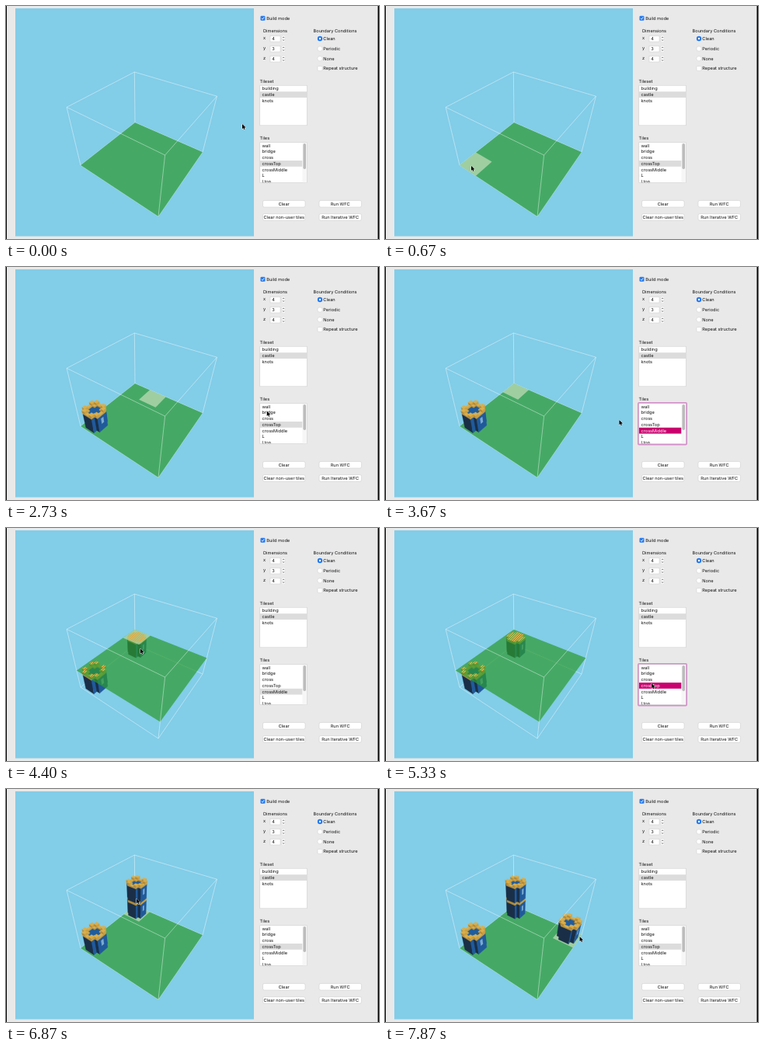
Recreate the animation shown at these times as an HTML page with a canvas. Size 480 by 300 pixels, loop 8000 ms.

```html
<!DOCTYPE html>
<html lang="en">
<head>
<meta charset="utf-8">
<title>Tile builder</title>
<style>
html, body { margin: 0; width: 100%; height: 100%; overflow: hidden; background: #e9e9e9; }
svg, canvas { position: absolute; left: 0; top: 0; width: 480px; height: 300px; }
text { font: 5.65px Inter, "Liberation Sans", sans-serif; fill: #111; text-rendering: geometricPrecision; }
.box { fill: #fff; stroke: #c9c9c9; stroke-width: .5; }
</style>
</head>
<body>
<svg id="panel" viewBox="0 0 480 300"></svg>
<canvas id="view"></canvas>
<script>
// ---- side panel ----
const text = (x, y, s, extra = '') => `<text x="${x}" y="${y}" ${extra}>${s}</text>`;
const rect = (x, y, w, h, extra = 'class="box"') =>
  `<rect x="${x}" y="${y}" width="${w}" height="${h}" ${extra}/>`;
const ROW = 7.75;
const tiles = ['wall', 'bridge', 'cross', 'crossTop', 'crossMiddle', 'L', 'Ltop'];
const rows = (list, y) => list.map((s, i) => text(329.5, y + i * ROW, s)).join('');
const dimension = (name, value, y) =>
  text(331, y + 1.2, name) + rect(340, y - 3.8, 13, 7.6) + text(342.3, y + 2, value) +
  rect(355, y - 4.2, 4.4, 8.4, 'rx="1.6" fill="#fff" stroke="#d2d2d2" stroke-width=".4"') +
  `<path d="M356.1 ${y - 1}l1.1-1.4 1.1 1.4M356.1 ${y + 1}l1.1 1.4 1.1-1.4" fill="none" stroke="#333" stroke-width=".6"/>`;
const radio = (name, y, on) =>
  `<circle cx="404" cy="${y}" r="3.2" ${on ? 'fill="#2479ee"' : 'class="box"'}/>` +
  (on ? `<circle cx="404" cy="${y}" r="1.2" fill="#fff"/>` : '') + text(408.3, y + 2, name);
const button = (name, x, y) =>
  rect(x, y, 54.5, 8.6, 'rx="2" class="box"') + text(x + 27.2, y + 6.3, name, 'text-anchor="middle"');

document.getElementById('panel').innerHTML =
  rect(0, 0, 480, 300, 'fill="#e9e9e9"') +
  rect(0, 0, 1, 300, '') + rect(478.5, 0, 1.5, 300, '') +
  rect(327.5, 12.7, 6, 6, 'rx="1.3" fill="#2479ee"') +
  '<path d="M329 15.8l1.2 1.4 2-3" fill="none" stroke="#fff" stroke-width=".8"/>' +
  text(335.3, 17.8, 'Build mode') +
  text(331, 34.2, 'Dimensions') +
  dimension('x', 4, 42.2) + dimension('y', 3, 55.2) + dimension('z', 4, 68.2) +
  text(395.6, 34.2, 'Boundary Conditions') +
  radio('Clean', 42, true) + radio('Periodic', 55) + radio('None', 67.7) +
  rect(401, 77.4, 6, 6, 'rx="1.3" class="box"') + text(408.3, 82.4, 'Repeat structure') +
  text(326.5, 98.8, 'Tileset') + rect(326.8, 102.2, 60.4, 51.6) +
  rect(327, 110.2, 60, ROW, 'fill="#dcdcdc"') + rows(['building', 'castle', 'knots'], 108.2) +
  text(326.5, 172.2, 'Tiles') +
  rect(326, 175, 62, 53.4, 'id="ring" rx="1" fill="none" stroke="#d58fcb" stroke-width="2"') +
  rect(326.8, 175.8, 60.4, 51.6) +
  '<clipPath id="clip">' + rect(327, 176, 60, 51.2, '') + '</clipPath><g clip-path="url(#clip)">' +
  rect(327, 0, 54.5, ROW, 'id="pick"') + `<g id="names">${rows(tiles, 181.7)}</g>` +
  rect(381.5, 176, 6, 52, 'fill="#f6f6f6"') + rect(382.4, 177, 3.6, 33, 'rx="1.8" fill="#bcbcbc"') + '</g>' +
  button('Clear', 330.5, 250.4) + button('Run WFC', 403, 250.4) +
  button('Clear non-user tiles', 330.5, 267.5) + button('Run Iterative WFC', 403, 267.5);

const ring = document.getElementById('ring'), pick = document.getElementById('pick');
const names = document.getElementById('names').children;

function showSelection(t) {
  const focus = t >= 3600 && t < 4000 || t >= 5330 && t < 6330;
  const index = t >= 3600 && t < 5330 ? 4 : 3;
  ring.style.display = focus ? '' : 'none';
  pick.setAttribute('y', 175.8 + index * ROW);
  pick.setAttribute('fill', focus ? '#c9006e' : '#dcdcdc');
  [...names].forEach((n, i) => n.style.fill = focus && i === index ? '#fff' : '');
}

// ---- 3D view ----
const canvas = document.getElementById('view'), ctx = canvas.getContext('2d');
const dpr = window.devicePixelRatio || 1;
canvas.width = 480 * dpr;
canvas.height = 300 * dpr;
ctx.scale(dpr, dpr);

const GOLD = ['#d9ae4d', '#b48a38', '#c99f42'];   // top, left, right
const BLUE = ['#1f5d9f', '#1a2f47', '#205a9b'];
const levelAt = t => t >= 4400 && t < 6870 ? 1 : 0;

// perspective camera over a 4 x 3 x 4 box
function project(x, y, z) {
  const u = x / 4, v = y / 3, w = z / 4;
  const d = 1 - .161 * u - .152 * v - .2218 * w;
  return [(166 + 46.27 * u - 25.8 * v - 91.29 * w) / d,
          (150 + 7.73 * u - 77.92 * v + 9.53 * w) / d];
}

// grid cell of the plane at a height under a screen point
function cellAt(X, Y, height) {
  const v = height / 3, k = 1 - .152 * v;
  const a = 46.27 + .161 * X, b = .2218 * X - 91.29, p = X * k - 166 + 25.8 * v;
  const c = 7.73 + .161 * Y, d = 9.53 + .2218 * Y, q = Y * k - 150 + 77.92 * v;
  const det = a * d - b * c;
  const cell = [p * d - b * q, a * q - c * p].map(n => Math.floor(4 * n / det));
  return cell.every(n => n >= 0 && n < 4) ? cell : null;
}

function shape(points, fill, seam) {
  ctx.beginPath();
  points.forEach(p => ctx.lineTo(...project(...p)));
  ctx.closePath();
  ctx.fillStyle = fill;
  ctx.fill();
  if (!seam) return;
  ctx.strokeStyle = fill;
  ctx.lineWidth = .3;
  ctx.stroke();
}

const flat = (x0, x1, z0, z1, y, fill, seam) =>
  shape([[x0, y, z0], [x1, y, z0], [x1, y, z1], [x0, y, z1]], fill, seam);

function box([a, b, c, d], y0, y1, [cx, cz], [top, left, right]) {
  const x0 = cx + a, x1 = cx + b, z0 = cz + c, z1 = cz + d;
  shape([[x0, y0, z1], [x1, y0, z1], [x1, y1, z1], [x0, y1, z1]], left, true);
  shape([[x1, y0, z0], [x1, y0, z1], [x1, y1, z1], [x1, y1, z0]], right, true);
  flat(x0, x1, z0, z1, y1, top, true);
}

// footprints [x0, x1, z0, z1]: strips of width w on all four sides, back ones first
const arms = (a, b, w) =>
  [.08, .92 - w].flatMap(e => [[e, e + w, a, b], [a, b, e, e + w]]);
const byDepth = list => list.sort((p, q) => p[1] + p[3] - q[1] - q[3]);
const PLUS = byDepth([...arms(.25, .75, .17), [.25, .75, .25, .75]]);
const MERLONS = byDepth([...arms(.22, .38, .16), ...arms(.62, .78, .16)]);
const corners = [.22, .64].flatMap(x => [.22, .64].map(z => [x, x + .14, z, z + .14]));
const sides = arms(.25, .75, .14);
const RIM = [...sides.slice(0, 2), ...corners, ...sides.slice(2)];

const towers = [
  { t: 4000, cell: [0, 0], y: 0 },
  { t: 6330, cell: [0, 0], y: 1, crown: true },
  { t: 7870, cell: [3, 0], y: 0, crown: true },
  { t: 1000, cell: [0, 3], y: 0, crown: true }
];

function drawTower({ cell, y, crown }) {
  const layer = (parts, from, to, colors) => parts.forEach(p => box(p, y + from, y + to, cell, colors));
  const h = crown ? .82 : .86;
  layer(PLUS, 0, h, BLUE);
  const x = cell[0] + .92, z = cell[1] + .43;
  shape([[x, y + .36, z], [x, y + .36, z + .14], [x, y + .68, z + .14], [x, y + .68, z]], '#79a9cf');
  if (crown) {
    layer(RIM, h, .88, GOLD);
    layer(MERLONS, .88, 1, GOLD);
  } else layer(PLUS, h, 1, GOLD);
}

// speckle where tower tops share the plane's height
const dots = document.createElement('canvas');
dots.width = dots.height = 3;
const dc = dots.getContext('2d');
dc.fillStyle = GOLD[0];
dc.fillRect(0, 0, 3, 3);
for (let i = 0; i < 3; i++) dc.clearRect(i, 2 * i % 3, 1, 1);
const speckle = ctx.createPattern(dots, 'repeat');

function wires(...lines) {
  ctx.beginPath();
  for (const [a, b] of lines) {
    ctx.moveTo(...project(...a));
    ctx.lineTo(...project(...b));
  }
  ctx.strokeStyle = 'rgba(255,255,255,.6)';
  ctx.lineWidth = .7;
  ctx.stroke();
}
const pillar = (x, z) => [0, 3].map(y => [x, y, z]);
const [B, R, F, L] = [pillar(0, 0), pillar(4, 0), pillar(4, 4), pillar(0, 4)];

// cursor stops: arrival time, x, y, departure if it rests
const stops = [
  [0, 304, 152, 70], [140, 345, 134], [270, 270, 174], [330, 205, 193], [400, 160, 199],
  [530, 118, 203], [730, 108, 207, 900], [1200, 117, 214, 1470], [1530, 160, 189.5],
  [1670, 337, 190, 1800], [1870, 337, 187, 2010], [2200, 203, 192], [2270, 157, 198],
  [2330, 151, 172], [2400, 187, 168, 2690], [2730, 337, 185.5], [2870, 158, 198],
  [2930, 135, 187], [3000, 168, 159], [3070, 340, 200, 3220], [3400, 337, 208.5, 3600],
  [3930, 171.5, 155, 4400], [4470, 270, 180], [4930, 345, 201, 5070], [5130, 343, 200, 5500],
  [5870, 283.5, 165], [6130, 172, 145], [6330, 168, 141, 7210], [7330, 174, 183],
  [7470, 184, 213], [7530, 193, 244], [7600, 208, 226], [7670, 222, 208], [7800, 250.5, 190]
];

// the highlighted cell after each stop; it stays while the cursor is over the panel
let hovered = null;
const hovers = stops.map(([t, x, y]) => {
  const leaving = t === 1530;
  if (x < 319 && !leaving) hovered = cellAt(x, y, levelAt(t));
  return hovered;
});

function pointer(t) {
  const i = stops.findLastIndex(s => s[0] <= t);
  const [t0, x, y, depart = t0] = stops[i], next = stops[i + 1];
  const f = next && t > depart ? (t - depart) / (next[0] - depart) : 0;
  return { x: x + (next ? next[1] - x : 0) * f, y: y + (next ? next[2] - y : 0) * f, cell: hovers[i] };
}

const arrow = new Path2D('M0 0V6.3L1.5 5 2.5 7.2 3.5 6.8 2.6 4.7 4.6 4.6Z');
function drawPointer({ x, y }) {
  ctx.save();
  ctx.translate(x, y);
  ctx.lineWidth = .9;
  ctx.strokeStyle = '#fff';
  ctx.stroke(arrow);
  ctx.fillStyle = '#000';
  ctx.fill(arrow);
  ctx.restore();
}

function drawView(t) {
  const level = levelAt(t), mouse = pointer(t);
  const placed = towers.filter(o => t >= o.t);
  ctx.clearRect(0, 0, 480, 300);
  ctx.fillStyle = '#82cde8';
  ctx.fillRect(12, 3, 307, 293.5);
  wires([B[0], R[0]], [R[0], F[0]], [F[0], L[0]], [L[0], B[0]], B, L, R, [B[1], L[1]], [B[1], R[1]]);

  const below = placed.filter(o => o.y < level);
  below.forEach(drawTower);
  flat(0, 4, 0, 4, level, 'rgba(44,154,46,.7)');
  if (mouse.cell) {
    const [x, z] = mouse.cell;
    flat(x, x + 1, z, z + 1, level, 'rgba(225,232,205,.58)');
  }
  for (const { cell: [x, z], crown } of below)
    for (const [a, b, c, d] of crown ? MERLONS : PLUS)
      flat(x + a, x + b, z + c, z + d, level, speckle);
  placed.filter(o => o.y >= level).forEach(drawTower);

  wires(F, [L[1], F[1]], [F[1], R[1]]);
  drawPointer(mouse);
}

function frame(now) {
  const t = now % 8000;
  showSelection(t);
  drawView(t);
  requestAnimationFrame(frame);
}
frame(0);
</script>
</body>
</html>
```
